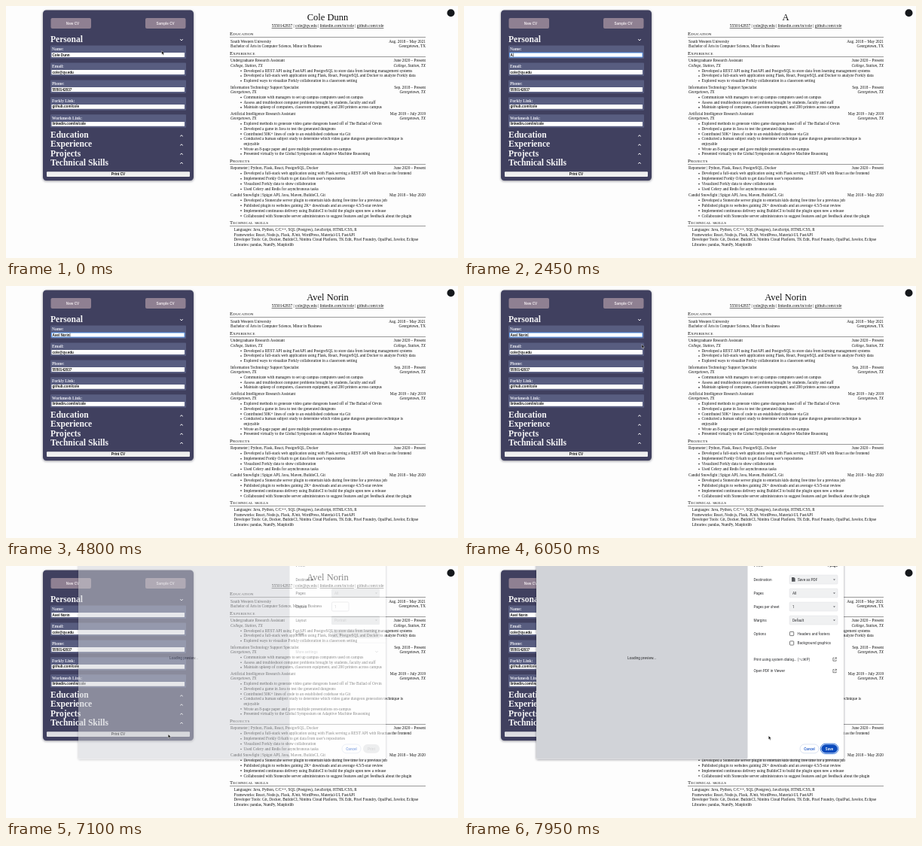
An HTML page that plays this animation: 600 px wide and 335 px high, repeating every 8 s.

```html
<!DOCTYPE html>
<html lang="en">
<head>
<meta charset="utf-8">
<title>CV builder</title>
<style>
  html, body { margin: 0; width: 600px; height: 335px; overflow: hidden; background: #fdfdfd; }
  svg { display: block; }
  text { white-space: pre; }
  .cv { font: 5.25px "Liberation Serif", serif; fill: #111; }
  .cv .item { font-size: 5.35px; }
  .cv .it { font-style: italic; }
  .cv .head { font-size: 6.8px; font-variant: small-caps; letter-spacing: .2px; }
  .cv .contact { font-size: 5.5px; }
  .cv .contact tspan { text-decoration: underline; }
  #title { font-size: 12.5px; }
  .end { text-anchor: end; }
  .mid { text-anchor: middle; }
  .h2 { font: bold 11.55px "Liberation Serif", serif; fill: #f4f4f6; }
  .label { font: bold 5.5px "Liberation Serif", serif; fill: #e6e6ee; }
  .ui { font: bold 4.65px "Liberation Sans", sans-serif; fill: #111; }
  .btn { fill: #ece4ea; }
  .dlg { font: 4.75px Roboto, sans-serif; fill: #2b2c2f; }
  .off { fill: #a9abaf; }
</style>
</head>
<body>
<svg id="stage" width="600" height="335" viewBox="0 0 600 335"></svg>
<script>
const OLD_NAME = 'Cole Dunn', NEW_NAME = 'Avel Norin';
const KEY_TIMES = [2350, 2750, 3100, 3200, 3550, 3800, 4100, 4250, 4550, 4750];
const FOCUS = 1650, SELECT = 1800, CLICK = 6850, OPEN = 7100, READY = 7450, LOOP = 8000;

const text = (x, y, s, cls = '', extra = '') => `<text x="${x}" y="${y}" class="${cls}" ${extra}>${s}</text>`;
const rect = (x, y, w, h, fill, r = 0, extra = '') =>
  `<rect x="${x}" y="${y}" width="${w}" height="${h}" rx="${r}" fill="${fill}" ${extra}/>`;
const line = (d, color, w) => `<path d="${d}" fill="none" stroke="${color}" stroke-width="${w}"/>`;

// ---- Resume ----
const heading = (y, s) => text(297, y, s, 'head') + rect(297, y + 2.3, 260, .5, '#333');
const pair = (y, left, right, cls = '') => text(298, y, left, cls) + text(557, y, right, cls + ' end');
const bullets = (y, step, items) => items.map((s, i) =>
  (s[0] === '~' ? '' : `<circle cx="312" cy="${y + i * step - 1.5}" r=".8"/>`) +
  text(315.5, y + i * step, s.replace('~', ''), 'item')).join('');
const job = (y, role, dates, place, items) =>
  pair(y, role, dates) + pair(y + 6.4, place, place, 'it') + bullets(y + 13.5, 6.65, items);
const project = (y, name, dates, items) => pair(y, name, dates) + bullets(y + 7, 6.9, items);

const resume = `<g class="cv">
  ${text(427, 19, OLD_NAME, 'mid', 'id="title"')}
  ${text(427, 28, ['5550142837', 'cole@qv.edu', 'linkedin.com/in/cole', 'github.com/cole']
    .map(s => `<tspan>${s}</tspan>`).join(' | '), 'contact mid')}
  ${heading(39.2, 'Education')}
  ${pair(48.7, 'South Western University', 'Aug. 2018 – May 2021')}
  ${pair(55, 'Bachelor of Arts in Computer Science, Minor in Business', 'Georgetown, TX')}
  ${heading(64.8, 'Experience')}
  ${job(74.3, 'Undergraduate Research Assistant', 'June 2020 – Present', 'College, Station, TX', [
    'Developed a REST API using FastAPI and PostgreSQL to store data from learning management systems',
    'Developed a full-stack web application using Flask, React, PostgreSQL and Docker to analyze Forkly data',
    'Explored ways to visualize Forkly collaboration in a classroom setting'])}
  ${job(109.6, 'Information Technology Support Specialist', 'Sep. 2018 – Present', 'Georgetown, TX', [
    'Communicate with managers to set up campus computers used on campus',
    'Assess and troubleshoot computer problems brought by students, faculty and staff',
    'Maintain upkeep of computers, classroom equipment, and 200 printers across campus'])}
  ${job(144.8, 'Artificial Intelligence Research Assistant', 'May 2019 – July 2019', 'Georgetown, TX', [
    'Explored methods to generate video game dungeons based off of The Ballad of Orvin',
    'Developed a game in Java to test the generated dungeons',
    'Contributed 50K+ lines of code to an established codebase via Git',
    'Conducted a human subject study to determine which video game dungeon generation technique is',
    '~enjoyable',
    'Wrote an 8-page paper and gave multiple presentations on-campus',
    'Presented virtually to the Global Symposium on Adaptive Machine Reasoning'])}
  ${heading(207.8, 'Projects')}
  ${project(217.3, 'Repometer | Python, Flask, React, PostgreSQL, Docker', 'June 2020 – Present', [
    'Developed a full-stack web application using with Flask serving a REST API with React as the frontend',
    "Implemented Forkly OAuth to get data from user's repositories",
    'Visualized Forkly data to show collaboration',
    'Used Celery and Redis for asynchronous tasks'])}
  ${project(252.8, 'Candid Snowfight | Spigot API, Java, Maven, BuildoCI, Git', 'May 2018 – May 2020', [
    'Developed a Stonecube server plugin to entertain kids during free time for a previous job',
    'Published plugin to websites gaining 2K+ downloads and an average 4.5/5-star review',
    'Implemented continuous delivery using BuildoCI to build the plugin upon new a release',
    'Collaborated with Stonecube server administrators to suggest features and get feedback about the plugin'])}
  ${heading(289.8, 'Technical skills')}
  ${['Languages: Java, Python, C/C++, SQL (Postgres), JavaScript, HTML/CSS, R',
    'Frameworks: React, Node.js, Flask, JUnit, WordPress, Material-UI, FastAPI',
    'Developer Tools: Git, Docker, BuildoCI, Nimbra Cloud Platform, TK Edit, Pixel Foundry, OpalPad, Javelor, Eclipse',
    'Libraries: pandas, NumPy, Matplotlib'].map((s, i) => text(302.5, 299.3 + i * 6.5, s)).join('')}
</g>`;

// ---- Form panel ----
const field = ([label, value], i) => {
  const y = 52.5 + i * 22.95;
  return rect(59, y, 180, 17.5, '#585d80', 1) + text(61, y + 6.2, label, 'label') +
    rect(60.5, y + 9.6, 176.5, 5.9, '#fff', .4, i ? '' : 'id="nameBox"') +
    (i ? text(61.5, y + 14.1, value, 'ui')
       : rect(61.3, y + 9.9, 23, 5.3, '#b3d4fc', 0, 'id="selection"') +
         text(61.5, y + 14.1, value, 'ui', 'id="nameText"') +
         rect(0, y + 10, .5, 5, '#111', 0, 'id="caret"'));
};
const chevron = (x, y, dir, color = '#fff', w = 1) =>
  line(`M${x - 1.8} ${y - dir * .8}L${x} ${y + dir * .8}L${x + 1.8} ${y - dir * .8}`, color, w);

const panel = `
  ${rect(49, 5.5, 200, 226.5, '#3f415f', 4.5, 'filter="url(#soft)"')}
  ${rect(59.5, 16, 53.5, 14, '#8f8092', 2)}${text(88.5, 24.7, 'New CV', 'ui btn mid')}
  ${rect(185, 16, 53.5, 14, '#8f8092', 2)}${text(211.5, 24.7, 'Sample CV', 'ui btn mid')}
  ${text(59, 48.4, 'Personal', 'h2')}${chevron(233, 45, 1)}
  ${[['Name:', OLD_NAME], ['Email:', 'cole@qv.edu'], ['Phone:', '5550142837'],
    ['Forkly Link:', 'github.com/cole'], ['Workmesh Link:', 'linkedin.com/in/cole']].map(field).join('')}
  ${['Education', 'Experience', 'Projects', 'Technical Skills'].map((s, i) =>
    text(59, 175.3 + i * 12.1, s, 'h2') + chevron(233, 172.5 + i * 12.1, -1)).join('')}
  ${rect(54, 220.3, 190, 6.8, '#efefef', 1, 'id="printBtn"')}
  ${text(149, 225.3, 'Print CV', 'ui mid')}`;

// ---- Print dialog ----
const row = (y, s, cls = '') => text(384.5, y + 1.6, s, cls);
const select = (y, value, off, x = 436) =>
  rect(432, y - 6, 64, 12, off ? '#dfe0e2' : '#f0f1f2', 1.5, off ? '' : 'stroke="#d9dadd" stroke-width=".4"') +
  text(x, y + 1.6, value, off ? 'off' : '') +
  `<path d="M490 ${y - .6}h3l-1.5 1.7z" fill="${off ? '#a0a2a6' : '#55575b'}"/>`;
const check = (y, s) =>
  rect(432.5, y - 2.6, 5.2, 5.2, 'none', .7, 'stroke="#444" stroke-width=".7"') + text(442.5, y + 1.6, s);
const openIcon = y => line(`M491.5 ${y - 2}h-1.6v4.2h4.2v-1.6M492.6 ${y - 2.2}h1.7v1.7M494.2 ${y - 2.1}l-2.6 2.6`, '#333', .6);

const dialog = `<g id="dialog" class="dlg">
  ${rect(96, -6, 408, 262.5, '#fff', 2, 'filter="url(#soft)"')}
  ${rect(96, -6, 280.5, 262.5, '#d1d3d8', 2)}
  ${text(236, 123.6, 'Loading preview...', 'mid')}
  ${text(384.5, 1.4, 'Print', '', 'font-size="6"')}
  <g id="loading">
    ${row(18, 'Destination')}${rect(434.5, 15, 2, .5, '#999')}
    ${row(36, 'Pages')}${select(36, 'All', true)}
    ${row(54, 'Copies')}${rect(432.5, 48, 22.5, 12, '#fff', 1.5, 'stroke="#c9cbcf" stroke-width=".6"')}
    ${text(436, 55.6, '1', 'off')}
    ${row(72, 'Layout')}${select(72, 'Portrait', true)}
    ${row(90, 'Color')}${select(90, 'Color', true)}
    ${rect(376.5, 101.8, 127.5, .5, '#e3e4e6')}
    ${row(114, 'More settings', 'off')}${chevron(492, 114, 1, '#a9abaf', .6)}
    ${rect(474, 237, 22, 11.8, '#dfe0e2', 5.9)}${text(485, 244.6, 'Print', 'off mid')}
  </g>
  <g id="ready">
    ${text(496, 1.4, '1 page', 'end', 'font-weight="500"')}
    ${row(18, 'Destination')}${select(18, 'Save as PDF', false, 443)}
    <path d="M435 15h3l1.6 1.6v4.2h-4.6z" fill="#55575b"/>
    ${row(36, 'Pages')}${select(36, 'All')}
    ${row(54, 'Pages per sheet')}${select(54, '1')}
    ${row(72, 'Margins')}${select(72, 'Default')}
    ${row(90, 'Options')}${check(90, 'Headers and footers')}${check(102.5, 'Background graphics')}
    ${row(124, 'Print using system dialog... (⌥⌘P)')}${openIcon(124)}
    ${row(139.5, 'Open PDF in Viewer')}${openIcon(139.5)}
    ${rect(473.2, 236.2, 23.8, 13.4, 'none', 6.7, 'stroke="#0b57d0" stroke-width=".8"')}
    ${rect(474.3, 237.3, 21.6, 11.2, '#0b4bbd', 5.6)}
    ${text(485, 244.6, 'Save', 'mid', 'style="fill:#fff;font-weight:500"')}
  </g>
  ${rect(446, 237, 25, 11.8, '#fff', 5.9, 'stroke="#c3d0ea" stroke-width=".6"')}
  ${text(458.5, 244.6, 'Cancel', 'mid', 'style="fill:#1a56c9;font-weight:500"')}
</g>`;

const pointer = `<g id="pointer">
  <path id="arrow" d="M0 0V4.9L1.1 3.9 1.9 5.7 2.8 5.3 2 3.6H3.5Z" fill="#000" stroke="#fff" stroke-width=".4"/>
  <path id="beam" d="M-1-2.4Q0-2.4 0-1.6Q0-2.4 1-2.4M0-1.6V1.6M-1 2.4Q0 2.4 0 1.6Q0 2.4 1 2.4" fill="none" stroke="#222" stroke-width=".6"/>
</g>`;

const $ = id => document.getElementById(id);
$('stage').innerHTML = `<defs><filter id="soft" x="-10%" y="-10%" width="120%" height="120%">
  <feDropShadow dx="0" dy="1" stdDeviation="1.8" flood-color="#223" flood-opacity=".5"/></filter></defs>
  ${resume}${panel}<circle cx="590.5" cy="9.3" r="5" fill="#15181c"/>${dialog}${pointer}`;

// ---- Motion ----
const PATH = [[0, 206.7, 59.6], [50, 206.7, 59.6], [400, 209, 57], [700, 206, 58.5], [850, 206, 58.5],
  [1050, 207, 59], [1350, 207, 59], [1650, 204, 65], [5150, 204, 65], [5750, 237, 71],
  [5950, 237, 71], [6750, 215.3, 223.7], [7680, 215.3, 223.7], [7950, 404.3, 225.7], [LOOP, 404.3, 225.7]];

function pointerAt(t) {
  const i = Math.max(1, PATH.findIndex(p => p[0] > t));
  const [t0, x0, y0] = PATH[i - 1], [t1, x1, y1] = PATH[i];
  const u = (t - t0) / (t1 - t0), k = u * u * (3 - 2 * u);
  return [x0 + (x1 - x0) * k, y0 + (y1 - y0) * k];
}
const show = (id, on) => $(id).style.display = on ? '' : 'none';

function render(t) {
  const typed = KEY_TIMES.filter(k => k <= t).length;
  const name = typed ? NEW_NAME.slice(0, typed) : OLD_NAME;
  if ($('title').textContent !== name) $('title').textContent = $('nameText').textContent = name;

  const focused = t >= FOCUS && t < CLICK;
  const selected = t >= SELECT && !typed;
  const textWidth = $('nameText').getComputedTextLength();
  const lastKey = typed ? KEY_TIMES[typed - 1] : FOCUS;
  $('nameBox').setAttribute('stroke', focused ? '#5c9df2' : 'none');
  $('selection').setAttribute('width', textWidth + .4);
  $('caret').setAttribute('x', 61.7 + textWidth);
  show('selection', selected);
  show('caret', focused && !selected && (t - lastKey) % 1000 < 500);

  const [x, y] = pointerAt(t);
  const overInput = t < OPEN && x > 60 && x < 237 && [0, 1, 2, 3, 4].some(i => Math.abs(y - 65 - i * 22.95) < 3);
  $('pointer').setAttribute('transform', `translate(${x} ${y})`);
  show('pointer', t < KEY_TIMES[0] || t >= 5150);
  show('arrow', !overInput);
  show('beam', overInput);

  $('printBtn').setAttribute('fill', y > 220 ? '#dedee2' : '#efefef');
  show('dialog', t >= OPEN);
  $('dialog').style.opacity = Math.min(1, (t - OPEN + 50) / 100);
  show('loading', t < READY);
  show('ready', t >= READY);
}

const start = performance.now();
function tick() {
  render((performance.now() - start) % LOOP);
  requestAnimationFrame(tick);
}
tick();
</script>
</body>
</html>
```
